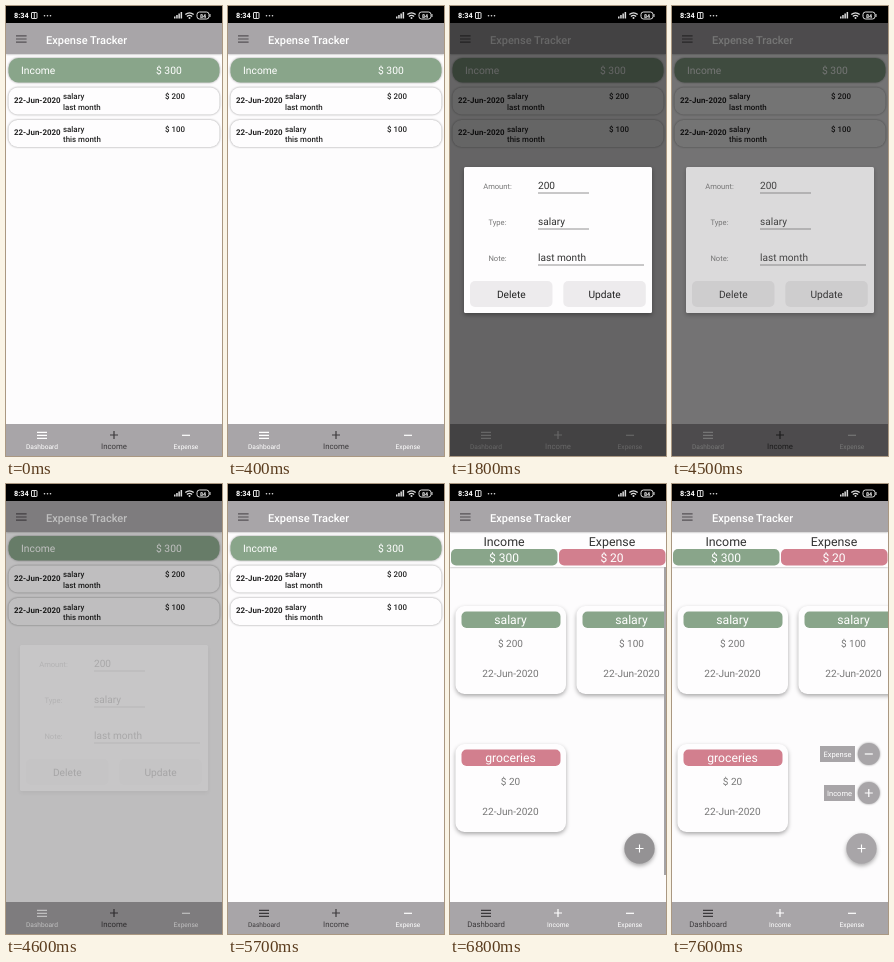
Recreate the animation shown at these times as an HTML page. Size 216 px wide and 450 px high, loop 8000 ms.

```html
<!DOCTYPE html>
<html lang="en">
<head>
<meta charset="utf-8">
<title>Expense Tracker</title>
<style>
  html, body { margin: 0; width: 100%; height: 100%; overflow: hidden; background: #fdfcfd; }
  svg { display: block; width: 100%; height: 100%; font-family: Roboto, sans-serif; text-rendering: geometricPrecision; }
  .card { filter: drop-shadow(0 .8px 1.2px #0006); }
  .raised { filter: drop-shadow(0 2px 2px #0005); }
</style>
</head>
<body>
<svg id="stage" viewBox="0 0 216 450"></svg>
<script>
const GREY = '#a8a5a8', GREEN = '#89a58a', PINK = '#d27f8e', DARK = '#3c3a3c';
const LOOP = 8000, STEP = 100;

const rect = (x, y, w, h, fill, r = 0, extra = '') =>
  `<rect x="${x}" y="${y}" width="${w}" height="${h}" rx="${r}" fill="${fill}" ${extra}/>`;
const text = (s, x, y, size, fill, anchor = 'start', weight = 400) =>
  `<text x="${x}" y="${y}" font-size="${size}" fill="${fill}" text-anchor="${anchor}" font-weight="${weight}">${s}</text>`;
const line = (d, color, width = 1, extra = '') =>
  `<path d="${d}" stroke="${color}" stroke-width="${width}" fill="none" ${extra}/>`;
const circle = (x, y, r, fill, extra = '') => `<circle cx="${x}" cy="${y}" r="${r}" fill="${fill}" ${extra}/>`;
const group = (id, content) => `<g id="${id}">${content}</g>`;
const plus = (x, y, r) => `M${x - r} ${y}h${2 * r}M${x} ${y - r}v${2 * r}`;
const minus = (x, y, r) => `M${x - r} ${y}h${2 * r}`;
const burger = (x, y, r, gap) => [-gap, 0, gap].map(dy => minus(x, y + dy, r)).join('');

const statusBar = () => rect(0, 0, 216, 17, '#000')
  + text('8:34', 8, 12, 7.3, '#fff', 'start', 700)
  + rect(25.5, 6.5, 5.5, 6, 'none', .5, 'stroke="#ddd"') + line('M28.3 7v5', '#ddd')
  + [38.5, 41.5, 44.5].map(x => circle(x, 9.8, .8, '#ddd')).join('')
  + [0, 1, 2, 3].map(i => rect(168 + i * 2.2, 10.5 - i * 1.5, 1.5, 2 + i * 1.5, '#ddd')).join('')
  + line('M179.3 8.6Q183.5 5 187.7 8.6M180.9 10.4Q183.5 8.2 186.1 10.4', '#ddd', 1.3)
  + circle(183.5, 12, 1, '#ddd')
  + rect(191, 6, 12, 7, 'none', 2.5, 'stroke="#ddd"') + rect(203.5, 8, 1, 3, '#ddd')
  + text('84', 197, 11.6, 5.4, '#fff', 'middle', 700);

const appBar = () => rect(0, 17, 216, 31, GREY, 0, 'class="card"')
  + line(burger(15.3, 33, 5.3, 3.1), '#555255', 1.1)
  + text('Expense Tracker', 40, 37.7, 11, '#fff', 'start', 500);

const entry = (y, note, amount) => rect(2.5, y, 211, 27, '#fefdfe', 9, 'class="card"')
  + text('22-Jun-2020', 8, y + 15, 7.9, '#222', 'start', 700)
  + text('salary', 57, y + 11.5, 7.9, '#222', 'start', 500)
  + text(note, 57, y + 22, 7.9, '#222', 'start', 500)
  + text(amount, 159, y + 11.5, 7.9, '#222', 'start', 500);

const incomeList = () => rect(0, 48, 216, 370, '#fdfcfd')
  + rect(2.5, 52, 211, 24.5, GREEN, 10, 'class="card"')
  + text('Income', 15, 68, 10.3, '#fff') + text('$ 300', 150, 68, 10.3, '#fff')
  + entry(81.5, 'last month', '$ 200') + entry(114, 'this month', '$ 100');

const total = (x, label, amount, color) => text(label, x, 62, 12.4, '#333', 'middle')
  + rect(x - 53, 65, 106.5, 16.5, color, 5) + text(amount, x, 77.8, 12, '#fff', 'middle');

const tile = (x, y, type, amount, color) => rect(x, y, 110.5, 88, '#fefdfe', 9, 'class="raised"')
  + rect(x + 6, y + 5.5, 99, 16.5, color, 5)
  + text(type, x + 55, y + 18.2, 12.2, '#fff', 'middle')
  + text(amount, x + 55, y + 41.2, 10, '#777', 'middle')
  + text('22-Jun-2020', x + 55, y + 71, 10.1, '#777', 'middle');

const menuItem = (label, x, y, sign) => rect(x, y - 8, 183 - x, 16, GREY)
  + text(label, (x + 183) / 2, y + 3, 7.5, '#fff', 'middle')
  + circle(196.8, y, 11, GREY, 'class="card"') + line(sign(196.8, y, 4), '#fff', 1.2);

const dashboard = () => rect(0, 48, 216, 370, '#fdfcfd')
  + rect(0, 48, 216, 35, '#fefdfe', 0, 'class="card"')
  + total(54, 'Income', '$ 300', GREEN) + total(162, 'Expense', '$ 20', PINK)
  + tile(5.5, 122, 'salary', '$ 200', GREEN) + tile(126.5, 122, 'salary', '$ 100', GREEN)
  + tile(5.5, 260, 'groceries', '$ 20', PINK)
  + rect(214, 83, 2, 308, '#a5a3a5', 0, 'id="scrollbar"')
  + group('menu', menuItem('Expense', 148, 270, minus) + menuItem('Income', 152, 309, plus))
  + circle(189.5, 364.5, 15.2, GREY, 'id="fab" class="raised"') + line(plus(189.5, 364.5, 4), '#fff', 1.1);

const tab = (id, label, x, icon) => group(id,
  line(icon, 'currentColor', 1.2) + text(label, x, 443.4, 6.6, 'currentColor', 'middle'));
const navBar = () => rect(0, 418, 216, 32, GREY)
  + tab('tabDashboard', 'Dashboard', 36, burger(36, 429.3, 5, 3))
  + tab('tabIncome', 'Income', 108, plus(108, 429, 4))
  + tab('tabExpense', 'Expense', 180, minus(180, 429.3, 4));

const field = (label, value, y, width) => text(label, 47.5, y - 1, 7.6, '#777', 'middle')
  + text(value, 88, y - 1, 10.1, '#333') + line(`M88 ${y + 3.5}h${width}`, '#777', .8);
const button = (label, x) => rect(x, 275, 82.5, 26, '#edebed', 5)
  + text(label, x + 41.3, 292, 10.2, '#222', 'middle');
const dialog = () => rect(14, 161, 188, 146, '#fefdfe', 1.5, 'class="raised"')
  + field('Amount:', '200', 183.5, 51) + field('Type:', 'salary', 219.5, 51)
  + field('Note:', 'last month', 255.5, 106)
  + button('Delete', 20) + button('Update', 113.3);

document.getElementById('stage').innerHTML = group('list', incomeList()) + group('dash', dashboard())
  + appBar() + navBar() + rect(0, 17, 216, 433, '#000', 0, 'id="dim"') + statusBar() + group('dialog', dialog());

const el = id => document.getElementById(id);
const fade = (id, opacity) => {
  el(id).style.opacity = opacity;
  el(id).style.visibility = opacity > 0 ? 'visible' : 'hidden';
};
const styleTab = (id, color, selected) => {
  el(id).style.color = color;
  el(id).querySelector('text').setAttribute('font-size', selected ? 7.8 : 6.6);
};

// Linear interpolation through [time, value] pairs.
const track = (t, ...keys) => {
  const next = keys.findIndex(([time]) => time > t);
  if (next === 0) return keys[0][1];
  if (next < 0) return keys[keys.length - 1][1];
  const [t0, v0] = keys[next - 1], [t1, v1] = keys[next];
  return v0 + (v1 - v0) * (t - t0) / (t1 - t0);
};

function render(t) {
  fade('dim', track(t, [1600, 0], [1700, .4], [1800, .6], [4400, .6], [4500, .54], [4600, .25], [4700, 0]));
  fade('dialog', track(t, [1600, 0], [1700, 1], [4400, 1], [4500, .75], [4600, .15], [4700, 0]));
  fade('dash', track(t, [5700, 0], [5800, .4], [5900, .8], [6000, 1]));
  fade('scrollbar', track(t, [7300, 1], [7600, 0]));

  const open = track(t, [6800, 0], [7000, .8], [7200, 1]);
  fade('menu', open);
  el('menu').setAttribute('transform', `translate(0 ${(1 - open) * 6})`);
  const press = track(t, [6700, 0], [6800, 1], [6900, 1], [7200, 0]);
  el('fab').style.fill = `rgb(${168 - 20 * press},${165 - 19 * press},${168 - 20 * press})`;

  const onDashboard = t >= 5800, dialogOpen = t >= 1700 && t < 4500;
  styleTab('tabDashboard', t >= 5700 ? DARK : '#fff', onDashboard);
  styleTab('tabIncome', onDashboard || dialogOpen ? '#fff' : DARK, !onDashboard);
  styleTab('tabExpense', '#fff', false);
}

const start = performance.now();
function tick() {
  const t = (performance.now() - start) % LOOP;
  render(Math.floor(t / STEP) * STEP);
  requestAnimationFrame(tick);
}
tick();
</script>
</body>
</html>
```
